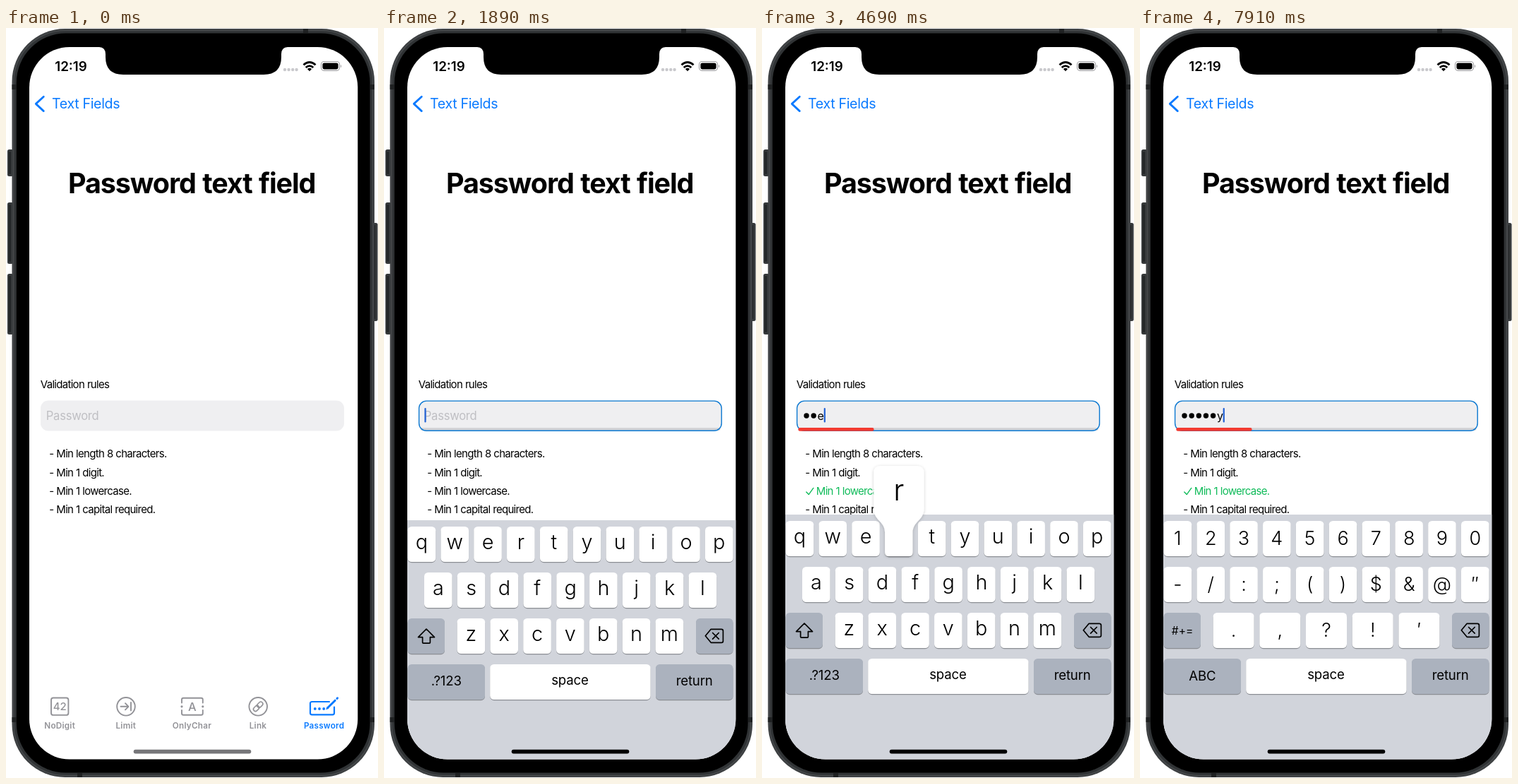
Write an HTML page that moves like this. It is 527 px wide and 1062 px high and loops after 8000 ms.

```html
<!DOCTYPE html>
<html lang="en">
<head>
<meta charset="utf-8">
<title>Password text field</title>
<style>
  html, body { margin: 0; width: 100%; height: 100%; overflow: hidden; background: #fff; }
  svg { display: block; width: 100vw; height: 100vh; }
  text { font-family: Inter, "Liberation Sans", sans-serif; font-optical-sizing: none; white-space: pre; }
  .mid { text-anchor: middle; }
  .title { font-size: 39.5px; font-weight: 700; letter-spacing: -1.1px; word-spacing: 1.2px; }
  .clock { font-size: 18.8px; font-weight: 600; }
  .back { font-size: 19.6px; letter-spacing: -.33px; fill: #0a7aff; }
  .body { font-size: 15px; letter-spacing: -.7px; word-spacing: .3px; }
  .hint { font-size: 16.6px; letter-spacing: -.27px; fill: #bfbfc3; }
  .typed { font-size: 16px; }
  .tab { font-size: 11.7px; font-weight: 600; letter-spacing: .25px; fill: #929297; }
  .key { font-size: 28.8px; font-weight: 360; }
  .num { font-size: 27px; font-weight: 360; }
  .word { font-size: 18.6px; letter-spacing: -.15px; }
  .big { font-size: 42px; font-weight: 340; }
  .line { fill: none; stroke-linecap: round; stroke-linejoin: round; }
</style>
</head>
<body>
<svg id="stage" viewBox="0 0 527 1062" preserveAspectRatio="none" xmlns="http://www.w3.org/2000/svg"></svg>
<script>
const LOOP = 8000;
const BLUE = '#0a7aff', GRAY = '#929297', GREEN = '#10bb5a';

const rect = (x, y, w, h, r, fill, more = '') =>
  `<rect x="${x}" y="${y}" width="${w}" height="${h}" rx="${r}" fill="${fill}" ${more}/>`;
const text = (x, y, cls, s, more = '') => {
  const safe = s.replace(/&/g, '&amp;').replace(/</g, '&lt;');
  return `<text x="${x}" y="${y}" class="${cls}" ${more}>${safe}</text>`;
};
const line = (d, color, w, more = '') =>
  `<path class="line" d="${d}" stroke="${color}" stroke-width="${w}" ${more}/>`;
const dot = (x, y, r, fill, more = '') => `<circle cx="${x}" cy="${y}" r="${r}" fill="${fill}" ${more}/>`;
const ring = (x, y, r, color, w) => dot(x, y, r, 'none', `stroke="${color}" stroke-width="${w}"`);
const group = (id, inner, more = '') => `<g id="${id}" ${more}>${inner}</g>`;

// ---------- phone ----------
function phoneBody() {
  const button = (x, y, h) => rect(x, y, 8, h, 2.5, '#35383a') + rect(x + 2.5, y + 3, 2, h - 6, 1, '#1d1f20');
  const band = (x, y, w, h) => rect(x, y, w, h, 0, '#1f2122');
  return button(2, 172, 38) + button(2, 247, 87) + button(2, 348, 86) + button(518.5, 276, 139) +
    rect(8.5, 1, 513.5, 1060, 75, '#3c3f41') +
    rect(10.2, 2.8, 510, 1056.4, 73.5, '#46494b') +
    rect(11.5, 4.2, 507.4, 1053.6, 72.5, '#303335') +
    band(8.5, 80, 6, 7) + band(516, 80, 6, 7) + band(8.5, 976, 6, 7) + band(516, 976, 6, 7) +
    band(421, 1, 7, 6) + band(101, 1055, 7, 6) +
    rect(14.8, 7.5, 500.8, 1047, 70, '#000');
}

function notch() {
  return '<path d="M128 20V27H132Q141 27.5 141 37V41Q141 66 166 66H365Q390 66 390 41V37Q390 27.5 399 27H403V20Z"/>';
}

function statusBar() {
  const cell = [395, 400.6, 406.2, 411.6].map(x => dot(x, 59, 2.2, '#c9c9cd')).join('');
  const wifi = line('M421.5 52.3Q430 44.8 438.5 52.3', '#000', 2.8, 'style="stroke-linecap:butt"') +
    line('M424.7 56Q430 51.2 435.3 56', '#000', 2.8, 'style="stroke-linecap:butt"') +
    '<path d="M426.9 58Q430 55.4 433.1 58L430 61.2Z"/>';
  const battery = rect(446.5, 47.5, 26, 12.8, 4, 'none', 'stroke="#a3a3a6" stroke-width="1.2"') +
    rect(448.4, 49.4, 22.2, 9, 2.4, '#000') + '<path d="M474 51.7Q476.4 54 474 56.2Z" fill="#a3a3a6"/>';
  return text(92, 61, 'clock mid', '12:19') + cell + wifi + battery;
}

// ---------- page ----------
function tabs() {
  const names = ['NoDigit', 'Limit', 'OnlyChar', 'Link', 'Password'];
  const labels = names.map((n, i) =>
    text(76.2 + i * 93.6, 991.5, 'tab mid', n, i === 4 ? `style="fill:${BLUE}"` : '')).join('');
  const small = 'style="font-size:15px;font-weight:500" fill="' + GRAY + '"';
  const digits = rect(64, 948.5, 24.4, 24.4, 3, 'none', `stroke="${GRAY}" stroke-width="1.9"`) +
    text(76.2, 966.3, 'mid', '42', small);
  const limit = ring(170, 960.8, 12.8, GRAY, 1.9) +
    line('M162.5 960.8H173M169 956.2L173.5 960.8L169 965.4M177 955V966.6', GRAY, 1.9);
  const chars = line('M249 955.5V951Q249 948.7 251.3 948.7H276.5Q278.8 948.7 278.8 951V955.5' +
      'M278.8 966V970.5Q278.8 972.8 276.5 972.8H251.3Q249 972.8 249 970.5V966', GRAY, 1.9) +
    dot(249, 960.8, 1.6, GRAY) + dot(278.8, 960.8, 1.6, GRAY) +
    text(263.9, 966.8, 'mid', 'A', small.replace('15px', '16.5px'));
  const pill = x => rect(x, -2.9, 9, 5.8, 2.9, 'none', `stroke="${GRAY}" stroke-width="1.6"`);
  const link = ring(357.2, 960.8, 12.8, GRAY, 1.9) +
    `<g transform="translate(357.2 960.8) rotate(-45)">${pill(-8.2)}${pill(-0.8)}</g>`;
  const pass = line('M458 954H433.5Q431 954 431 956.5V970Q431 972.3 433.5 972.3H462.5Q465 972.3 465 970V961.5', BLUE, 2.2) +
    [437.8, 444, 450.2].map(x => dot(x, 964, 1.9, BLUE)).join('') +
    line('M456 962.3L466.2 952.2', BLUE, 3) + line('M469 949.4L469.6 948.8', BLUE, 3) +
    `<path d="M453.2 965.2L454.6 960.9L457.5 963.8Z" fill="${BLUE}"/>`;
  return labels + digits + limit + chars + link + pass;
}

function page() {
  const rules = ['- Min length 8 characters.', '- Min 1 digit.', '- Min 1 lowercase.', '- Min 1 capital required.'];
  const list = rules.map((r, i) => text(61.3, 608.2 + i * 26.4, 'body', r, `id="rule${i}"`)).join('');
  const done = line('M62.8 657L66.2 660.6L72.8 651.4', GREEN, 1.4) +
    text(76.8, 661, 'body', 'Min 1 lowercase.', `fill="${GREEN}"`);
  const focus = rect(51.5, 566.2, 425, 3.6, 1.8, '#d0d0d4') +
    rect(49.6, 528.1, 428.6, 42.2, 10.5, 'none', 'stroke="#0a78d2" stroke-width="1.4"');
  return statusBar() +
    line('M53.3 97.2L42.3 107.4L53.3 117.6', BLUE, 2.8) + text(65, 114.2, 'back', 'Text Fields') +
    text(263.2, 233.7, 'title mid', 'Password text field') +
    text(48.8, 510.3, 'body', 'Validation rules') +
    rect(49, 527.5, 430, 43, 11, '#efeff1') +
    text(56.8, 555, 'hint', 'Password', 'id="hint"') +
    group('focus', focus) +
    rect(51.3, 566, 107.3, 4.8, 2.4, '#f23a31', 'id="bar"') +
    group('dots', '') + text(0, 554.8, 'typed', '', 'id="last"') +
    rect(0, 538, 2.2, 20.5, 1, '#2160d4', 'id="caret"') +
    list + group('done', done) + tabs();
}

// ---------- keyboard ----------
const PITCH = 46.82, KEY = 39.6;
const ROWS = [698, 763, 828, 893];

const key = (x, row, w, fill = '#fff') =>
  rect(x, ROWS[row] + 1.2, w, 50, 5.5, '#8b8e94') + rect(x, ROWS[row], w, 50, 5.5, fill);

function keyRow(chars, row, x, cls, rise, w = KEY, step = PITCH) {
  return [...chars].map((c, i) =>
    key(x + i * step, row, w) + text(x + i * step + w / 2, ROWS[row] + rise, cls + ' mid', c)).join('');
}

function keyboard() {
  const DARK = '#abb2be';
  const letters = keyRow('qwertyuiop', 0, 33.6, 'key', 32.3) + keyRow('asdfghjkl', 1, 57, 'key', 32.3) +
    keyRow('zxcvbnm', 2, 103.6, 'key', 32) +
    line('M60 843L71.5 854.6H65.4V862Q65.4 863.2 64.2 863.2H55.8Q54.6 863.2 54.6 862V854.6H48.5Z', '#000', 1.7) +
    text(88.3, 923.3, 'word mid', '.?123');
  const symbols = keyRow('1234567890', 0, 33.6, 'num', 34.3) + keyRow('-/:;()$&@″', 1, 33.6, 'num', 33.5) +
    keyRow('.,?!′', 2, 103.6, 'num', 34.2, 58, 65.7) +
    text(60, 858.7, 'mid', '#+=', 'font-size="15.5"') + text(88.3, 924.3, 'word mid', 'ABC');
  const erase = line('M463.2 843.3H478Q480.4 843.3 480.4 845.7V859.9Q480.4 862.3 478 862.3H463.2L455.3 852.8Z' +
    'M465.6 848.5L474.2 857.1M474.2 848.5L465.6 857.1', '#000', 1.7);
  return rect(30, 689, 472, 380, 0, '#d1d4db') +
    key(33.6, 2, 52.4, DARK) + key(442, 2, 52.4, DARK) + key(33.6, 3, 109.4, DARK) +
    key(150.2, 3, 227.4) + key(385, 3, 109.4, DARK) + erase +
    text(263.4, 922.3, 'word mid', 'space') + text(439.7, 923.3, 'word mid', 'return') +
    group('letters', letters) + group('symbols', symbols);
}

function popup(i) {
  const a = 33.6 + i * PITCH, b = a + KEY;
  const l = i ? a - 15.8 : a, r = i ? b + 15.8 : b + 30.8;
  const left = i ? `V714C${a} 698 ${l} 698 ${l} 680` : '';
  const right = i ? `C${r} 698 ${b} 698 ${b} 714` : `C${r} 690 ${b} 694 ${b} 716`;
  const d = `M${l + 10} 620H${r - 10}Q${r} 620 ${r} 630V${i ? 680 : 670}${right}V742.5Q${b} 748 ${b - 5.5} 748` +
    `H${a + 5.5}Q${a} 748 ${a} 742.5${left}V630Q${l} 620 ${l + 10} 620Z`;
  return rect(a, ROWS[0] + 1.2, KEY, 50, 5.5, '#8b8e94') +
    `<path d="${d}" fill="#fff" filter="url(#soft)"/>` +
    text(i ? (l + r) / 2 : 67.3, 669, 'big mid', 'qwerty'[i]);
}

const stage = document.getElementById('stage');
stage.innerHTML =
  '<defs><clipPath id="glass"><rect x="33" y="27" width="465.3" height="1008.5" rx="57"/></clipPath>' +
  '<filter id="soft" x="-20%" y="-20%" width="140%" height="140%">' +
  '<feDropShadow dx="0" dy="1" stdDeviation="2.2" flood-color="#000" flood-opacity=".2"/></filter></defs>' +
  phoneBody() +
  group('screen', rect(30, 20, 472, 1020, 0, '#fff') + page() + group('board', keyboard()) +
    group('pop', '') + rect(180.7, 1021.7, 166.6, 5.8, 2.9, '#000', 'id="home"'), 'clip-path="url(#glass)"') +
  notch();

// ---------- motion ----------
const $ = id => document.getElementById(id);
const show = (id, on) => $(id).setAttribute('visibility', on ? 'visible' : 'hidden');
const ramp = (t, a, b) => Math.min(1, Math.max(0, (t - a) / (b - a)));

const FOCUS = 1470, RISE = 1530, SWITCH = 7070;
const TAPS = [[2800, 3010], [4130, 4270], [4410, 4550], [4690, 5110], [5250, 5460], [5670, 5950]];
const BLINKS = [[2310, 2450, 2520, 2660], [3430, 3570, 3640, 3920], [4830, 4970, 5109, 5110],
  [6440, 6650, 7069, 7070], [7350, 7490, 7630, 7910]];
const ADVANCE = [10.2, 13, 9.6, 6.4, 6.3, 9.1];
const DOT_STEP = 10.15;

let shown = null;

function draw(t) {
  const focused = t >= FOCUS;
  const count = TAPS.filter(p => t >= p[1]).length;
  const held = TAPS.findIndex(p => t >= p[0] && t < p[1]);

  const w = Math.max(0, t - RISE) * 0.0157;
  const drop = 347 * (1 + w) * Math.exp(-w);
  $('board').setAttribute('transform', `translate(0 ${drop.toFixed(2)})`);
  show('board', t > RISE);
  $('home').setAttribute('fill', drop < 320 ? '#000' : '#77777a');

  show('focus', focused);
  show('hint', !count);
  show('letters', t > RISE && t < SWITCH);
  show('symbols', t >= SWITCH);
  show('rule2', !count);
  show('done', count);

  const grow = ramp(t, TAPS[0][1] - 35, TAPS[0][1] + 70);
  show('bar', count);
  $('bar').setAttribute('width', 107.3 * grow);

  const state = count + ':' + held;
  if (state !== shown) {
    shown = state;
    $('pop').innerHTML = held < 0 ? '' : popup(held);
    $('dots').innerHTML = Array.from({ length: Math.max(0, count - 1) },
      (_, i) => dot(63 + i * DOT_STEP, 549, 3.7, '#000')).join('');
    $('last').textContent = count ? 'qwerty'[count - 1] : '';
  }
  const x = 57.8 + Math.max(0, count - 1) * DOT_STEP;
  $('last').setAttribute('x', x + 0.4);
  $('caret').setAttribute('x', count ? x + ADVANCE[count - 1] : 57.4);
  const fade = BLINKS.reduce((o, [a, b, c, d]) => o - ramp(t, a, b) + ramp(t, c, d), 1);
  $('caret').setAttribute('opacity', focused ? fade : 0);
}

const begin = performance.now();
function tick() {
  draw((performance.now() - begin) % LOOP);
  requestAnimationFrame(tick);
}
tick();
</script>
</body>
</html>
```
